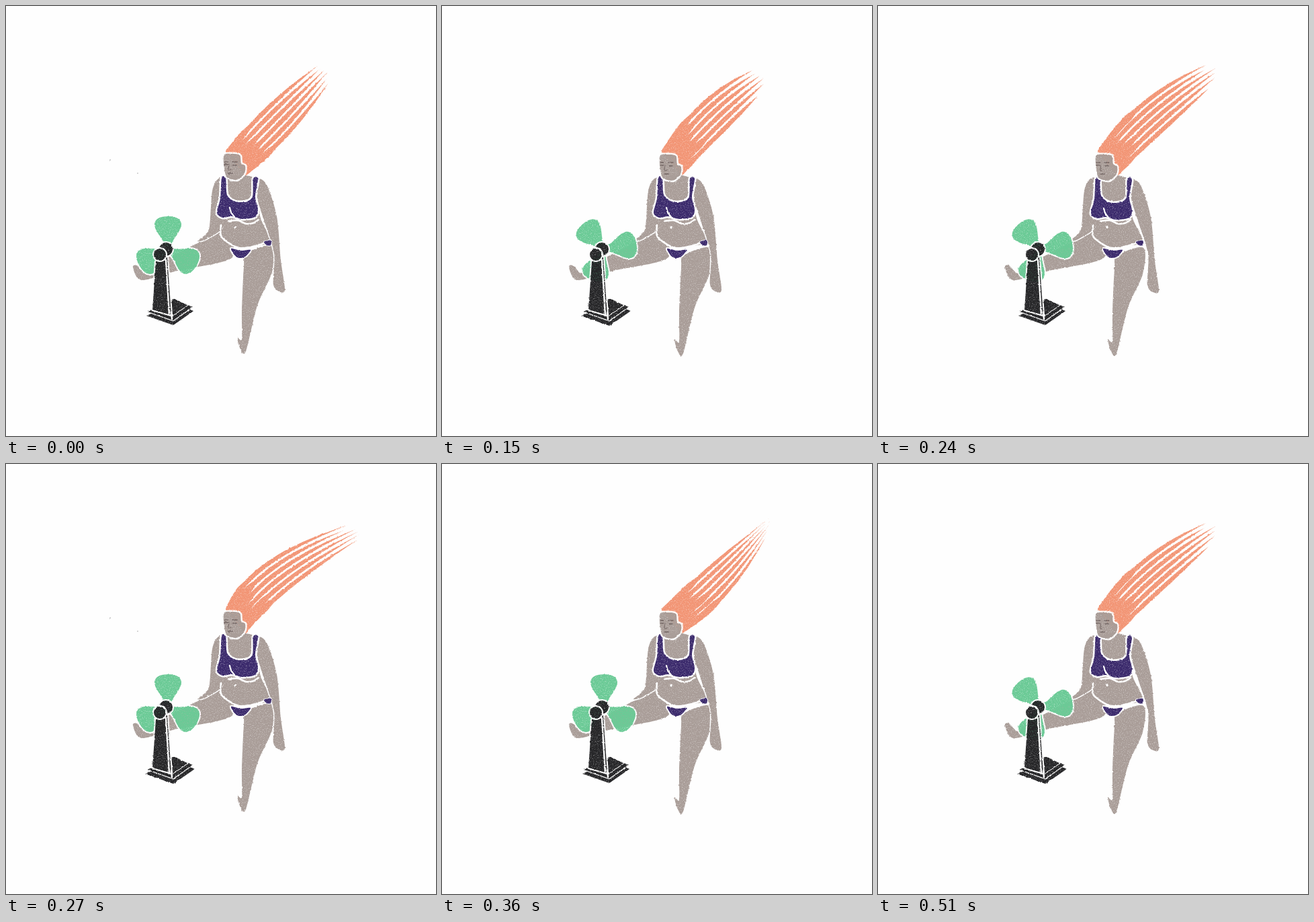
These frames come from a looping animation (640x640 px, 0.54 s). An HTML page:

```html
<!DOCTYPE html>
<html lang="en">
<head>
<meta charset="utf-8">
<style>
html, body { margin: 0; height: 100%; overflow: hidden; background: #fefefe; }
svg { display: block; width: 100vw; height: 100vh; }
path { stroke-linejoin: round; stroke-linecap: round; paint-order: stroke; }
</style>
</head>
<body>
<svg id="stage" viewBox="0 0 640 640"></svg>
<script>
const PAPER = '#fefefe', SKIN = '#a99d98', HAIR = '#f29575', CLOTH = '#3b2a6c',
      GREEN = '#6bca96', BLACK = '#262628', FACE = '#6d605e';

// Smooth path through [x, y] points or an "x,y x,y" string
function curve(pts, closed) {
  const p = typeof pts === 'string' ? pts.split(' ').map(s => s.split(',').map(Number)) : pts;
  const n = p.length, at = i => p[closed ? (i + n) % n : Math.max(0, Math.min(n - 1, i))];
  let d = 'M' + p[0];
  for (let i = 0; i < (closed ? n : n - 1); i++) {
    const [a, b, c, e] = [at(i - 1), at(i), at(i + 1), at(i + 2)];
    d += `C${b.map((v, k) => v + (c[k] - a[k]) / 7)} ${c.map((v, k) => v - (e[k] - b[k]) / 7)} ${c}`;
  }
  return d + (closed ? 'Z' : '');
}
const path = (d, fill, gap = 0) =>
  `<path d="${d}" fill="${fill}" stroke="${gap ? PAPER : 'none'}" stroke-width="${gap * 2}"/>`;
const shape = (pts, fill, gap) => path(curve(pts, true), fill, gap);
const line = (pts, color = PAPER, w = 2.6) =>
  `<path d="${curve(pts)}" fill="none" stroke="${color}" stroke-width="${w}"/>`;
const move = ([x, y], s) => `<g transform="translate(${x} ${y})">${s}</g>`;
const times = (n, f) => Array.from({ length: n }, (_, i) => f(i));

function random(seed) {
  return () => (seed = seed * 16807 % 2147483647) / 2147483647;
}

// Crayon texture: slightly ragged edges and light grain
const crayon = id => `<filter id="crayon${id}" color-interpolation-filters="sRGB">
  <feTurbulence type="fractalNoise" baseFrequency=".3" numOctaves="2" seed="${id * 7 + 3}"/>
  <feDisplacementMap in="SourceGraphic" scale="2.5" xChannelSelector="R" yChannelSelector="G" result="rough"/>
  <feTurbulence type="fractalNoise" baseFrequency=".63" numOctaves="3" seed="${id + 20}"/>
  <feColorMatrix values="0 0 0 0 0  0 0 0 0 0  0 0 0 0 0  1.2 0 0 0 .42"/>
  <feComposite in="rough" operator="in"/></filter>`;

const poses = [
  { torso: [0, 0], leg: [0, 0] },
  { torso: [1, 0], leg: [2, 3] },
  { torso: [3, 1], leg: [-2, 3] }
];

function body({ torso, leg }) {
  return shape('325,336 283,354 248,372 222,384 208,398 195,386 189,389 202,408 255,394 336,375', SKIN) +
    shape('316,257 307,275 303,328 297,340 285,350 300,346 326,324 326,262', SKIN, 1.5) +
    move(leg, shape('358,368 354,388 351,455 351,496 344,493 349,511 357,514 374,446 396,396 397,357', SKIN, 1)) +
    shape('336,254 322,268 325,322 320,336 324,350 346,359 374,357 394,349 378,312 380,264 357,252', SKIN) +
    move(torso,
      shape('374,258 388,266 403,313 409,378 415,421 409,426 398,415 399,368 384,319 374,286', SKIN, 1.5)) +
    line('320,326 321,344 346,360 372,357 394,349') + line('331,320 345,319 357,324 368,323 376,318') +
    shape('335,361 349,364 364,363 356,373 348,375 341,372', CLOTH, 2) +
    shape('384,351 394,349 394,356 388,356', CLOTH, 1) +
    move(torso,
      shape('321,256 327,256 329,281 341,291 358,291 367,283 368,257 375,257 371,284 375,303 371,314 352,317 336,313 323,315 314,308 319,286', CLOTH, 2.5) +
      line('333,300 335,307 340,314', PAPER, 2.2)) +
    line('341,329 341,330', PAPER, 3);
}

const head =
  shape('324,223 336,220 348,222 350,234 356,238 355,249 346,258 336,258 327,252', SKIN, 2.4) +
  [[325, 232, 5], [337, 232, 7], [325, 236, 5], [338, 237, 5], [331, 249, 6]]
    .map(([x, y, w]) => line([[x, y], [x + w, y]], FACE, 1.4)).join('') +
  line('332,236 331,244 335,243', FACE, 1);

const dust = [[155, 229], [196, 249]].map(([x, y]) => `<circle cx="${x}" cy="${y}" r=".8" fill="#999"/>`).join('');

// Locks fan out across a bent spine running from the head to a blowing tip
const ROOT = [342, 234], LOCKS = 6, STEPS = 14;
function hair({ bend, tip, end, seed }) {
  const rnd = random(seed);
  const width = s => 46 + 55 * s - (101 - end) * s * s;
  const point = (s, u) => [.64, .77].map((dir, k) =>
    (1 - s) ** 2 * ROOT[k] + 2 * s * (1 - s) * bend[k] + s * s * tip[k] + dir * width(s) * u);
  return times(LOCKS, i => {
    const mid = (i + .5) / LOCKS - .5, outer = Math.abs(mid) * 2;
    const length = 1.02 - outer * (.05 + .12 * rnd()), split = .15 + .22 * rnd();
    const edge = side => times(STEPS + 1, j => {
      const x = j / STEPS, s = x * length, gap = s < split ? -.4 : 1.35;
      const half = (.5 / LOCKS - gap / width(s)) * (1 - x ** 7);
      return point(s, mid + side * Math.max(0, half));
    });
    return shape([...edge(-1), ...edge(1).reverse()], HAIR);
  }).join('');
}
const hairs = [
  { bend: [400, 176], tip: [476, 97], end: 33, seed: 11 },
  { bend: [398, 161], tip: [476, 106], end: 38, seed: 52 },
  { bend: [402, 160], tip: [502, 96], end: 33, seed: 83 },
  { bend: [381, 164], tip: [522, 99], end: 30, seed: 34 },
  { bend: [415, 177], tip: [492, 82], end: 10, seed: 75 }
];

const BLADE = 'M4 -4C18 -8 26 -20 38 -20Q49 -18 49 0Q49 18 38 20C26 20 18 8 4 4Z';
const blades = turn => times(3, i =>
  `<g transform="translate(241 362) rotate(${turn + i * 120 - 90})">${path(BLADE, GREEN, 2)}</g>`).join('');

// Stepped base, column and motor; spread widens the base a little
function stand(spread) {
  const slab = (k, lift) => `<g transform="translate(244 ${455 - lift}) scale(${k})">` +
    path('M-35 6L5 20L35 -1L8 -14Z', BLACK, 1.3) + '</g>';
  return slab(1 + spread * .05, 0) + slab(.95, 6) + slab(.75, 9) +
    path('M223 380L240 374L246 460L218 452Z', BLACK, 2) + line('238,378 243,460', PAPER, 2.4) +
    line('246,456 247,466', PAPER, 2.4) +
    [[238, 362, 11], [229, 370, 10]].map(([x, y, r]) =>
      `<circle cx="${x}" cy="${y}" r="${r}" fill="${BLACK}" stroke="${PAPER}" stroke-width="2"/>`).join('');
}

const drawings = {
  body: poses.map((p, i) => body(p) + (i ? '' : dust)),
  hair: hairs.map(hair),
  head: poses.map((p, i) => move([0, i ? 1 : 0], head)),
  blades: times(3, i => blades(i * 40)),
  stand: [stand(0), stand(1)]
};
const stage = document.getElementById('stage');
stage.innerHTML = times(3, crayon).join('') + Object.entries(drawings).map(([name, list]) =>
  list.map((d, i) => `<g class="${name}" filter="url(#crayon${i % 3})">${d}</g>`).join('')).join('');

const show = (name, index) => [...stage.getElementsByClassName(name)]
  .forEach((g, i) => g.style.display = i === index ? '' : 'none');
const hairOrder = [0, 1, 2, 3, 4, 2];
let last = -1;

function render() {
  const tick = Math.floor(performance.now() % 540 / 30), hold = Math.floor(tick / 3);
  if (tick !== last) {
    last = tick;
    show('body', hold % 3);
    show('head', hold % 3);
    show('hair', hairOrder[hold]);
    show('stand', hold % 2);
    show('blades', tick % 3);
  }
  requestAnimationFrame(render);
}
render();
</script>
</body>
</html>
```
